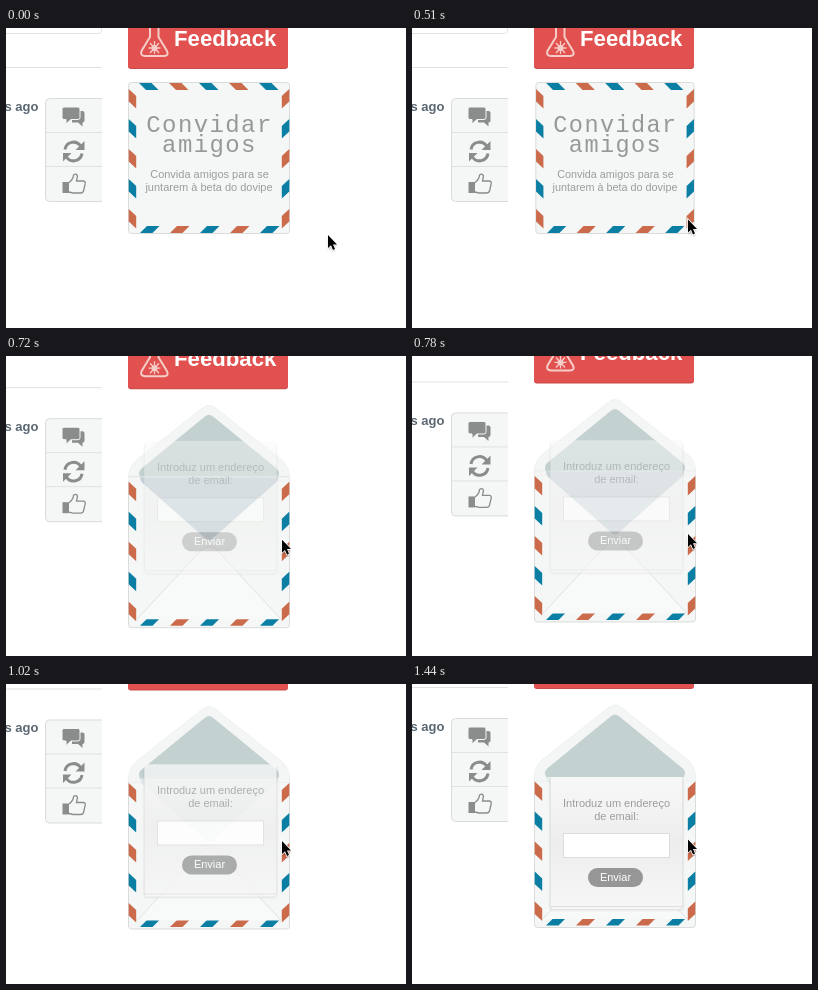
Recreate the animation shown at these times as an HTML page. Size 400 px wide and 300 px high, loop 2280 ms.

```html
<!DOCTYPE html>
<html lang="pt">
<head>
<meta charset="utf-8">
<title>Convidar amigos</title>
<style>
  html, body { margin: 0; width: 100%; height: 100%; overflow: hidden; background: #fff; }
  svg { display: block; width: 400px; height: 300px; }
  text { font-family: "Liberation Sans", Arial, sans-serif; font-size: 11px; fill: #9b9d9c; }
  .mid { text-anchor: middle; }
  .title { font: 24px "Courier New", "Liberation Mono", monospace; letter-spacing: 1.4px; fill: #979998; }
  .card { fill: #f4f7f5; stroke: #d9dcda; }
  .rule { stroke: #dfe2e1; fill: none; }
  .blue { fill: #0b7ea3; }
  .orange { fill: #cc6b4c; }
  .icon { fill: #8b8d8c; }
  .line { fill: none; stroke: #8b8d8c; }
</style>
</head>
<body>
<svg viewBox="0 0 400 300">
  <defs>
    <linearGradient id="paper" x2="0" y2="1">
      <stop offset="0" stop-color="#f8f8f8"/>
      <stop offset=".5" stop-color="#ededed"/>
      <stop offset="1" stop-color="#f6f6f6"/>
    </linearGradient>
    <filter id="soft" x="-20%" y="-20%" width="140%" height="140%">
      <feGaussianBlur stdDeviation="1.2"/>
    </filter>
    <clipPath id="column"><path d="M0 -50H96V400H0Z"/></clipPath>
  </defs>

  <g id="page">
    <g clip-path="url(#column)">
      <path class="rule" d="M0 5.5H92.500Q95.500 5.500 95.500 2.500V-9M0 39.500H96"/>
      <text x="-1.500" y="83" style="font-size:13px;font-weight:bold;fill:#5a6772">s ago</text>
      <rect class="card" x="39.500" y="70.500" width="70" height="103" rx="4"/>
      <path class="rule" d="M40 104.500H96M40 138.500H96"/>
      <g class="icon">
        <path d="M66 83H76.500Q78.500 83 78.500 85V92.500Q78.500 94.500 76.500 94.500V98.500L72 94.500H66Z"/>
        <path d="M58 79H72Q74 79 74 81V89.500Q74 91.500 72 91.500H65L60 96V91.500H58Q56 91.500 56 89.500V81Q56 79 58 79Z" stroke="#f4f7f5"/>
        <path d="M78.500 113V122H69.500ZM57 133.500V125H65.500Z"/>
        <path d="M56.500 154H63V165H56.500Z"/>
      </g>
      <path class="line" stroke-width="3" d="M59 121.500A8.500 8.500 0 0 1 74.500 118M76 125.500A8.500 8.500 0 0 1 60.500 129"/>
      <path class="line" stroke-width="1.300" d="M63 154.500Q67.500 151 67.500 147Q70.500 145 71.500 148L70.500 153H77.500Q80 153.500 79 156.500L77.500 163Q77 165 74.500 165H67L63 164"/>
    </g>

    <rect x="122" y="-20" width="160" height="61" rx="3" fill="#c94a49"/>
    <rect x="122" y="-20" width="160" height="60" rx="3" fill="#e0514f"/>
    <g fill="none" stroke="#f6cdc8" stroke-width="2">
      <path d="M144 -4V9L135.500 23Q134 28 139 28H158Q163 28 161 23L152.500 9V-4"/>
      <path stroke-width="1.300" d="M144 15L153 25M153 15L144 25M142.500 20H154.500M148.500 13V26"/>
    </g>
    <circle cx="148.500" cy="20" r="3" fill="#f6cdc8"/>
    <text x="168" y="18" style="font-size:22.200px;font-weight:bold;fill:#fff">Feedback</text>

    <g id="front">
      <rect class="card" x="122.500" y="54.500" width="161" height="151" rx="3"/>
      <g id="trim"></g>
      <text class="mid title" x="203.500" y="104">Convidar</text>
      <text class="mid title" x="203.500" y="124">amigos</text>
      <text class="mid" x="203.500" y="150">Convida amigos para se</text>
      <text class="mid" x="203" y="163">juntarem à beta do dovipe</text>
    </g>

    <g id="back">
      <g id="body">
        <rect class="card" x="122.500" y="54.500" width="161" height="151" rx="3"/>
        <g id="backTrim" transform="translate(0 -1.500)"></g>
        <path d="M131 197L195 128Q203 121 211 128L275 197" fill="#f8f9f9" stroke="#e0e3e2"/>
      </g>
      <g id="flap">
        <path d="M122 133Q122 119 130 112L196 60Q203 54 210 60L276 112Q284 119 284 133Z" fill="#f4f6f5" stroke="#ebeeed" stroke-width=".7"/>
        <path d="M134 129Q131 123 137 119L198 69Q203 64 208 69L269 119Q275 123 272 129Z" fill="#c4d1d1"/>
      </g>
      <path id="pocket" d="M134 129H272Q272 133 268 136L208 189Q203 195 198 189L138 136Q134 133 134 129Z" fill="#c0ccd3"/>
      <path id="lip" class="rule" d="M123 128.500H283"/>
    </g>

    <g id="form">
      <rect x="138" y="131" width="133" height="131" rx="3" fill="#000" opacity=".14" filter="url(#soft)"/>
      <rect x="138.500" y="129.500" width="132" height="132" rx="3" fill="#f6f6f6" stroke="#e4e4e4"/>
      <rect x="139" y="129" width="131" height="129" fill="url(#paper)"/>
      <path d="M139 258.500H270" stroke="#dedede"/>
      <text class="mid" x="204.500" y="159">Introduz um endereço</text>
      <text class="mid" x="204.500" y="172">de email:</text>
      <rect x="151.500" y="185.500" width="106" height="24" fill="#fff" stroke="#dcdcdc"/>
      <rect x="176" y="220" width="55" height="19" rx="9.500" fill="#959695"/>
      <text class="mid" x="203.500" y="233" style="fill:#fff">Enviar</text>
    </g>

    <g id="cursor">
      <path d="M0 2V15L3 12L5 16.500L7 15.500L5 11H9Z" fill="#000" opacity=".35" filter="url(#soft)"/>
      <path d="M0 0V13L3 10.200L5 15L7 14.100L5 9.400H9Z" fill="#000" stroke="#fff" stroke-width="1.600" paint-order="stroke"/>
    </g>
  </g>
</svg>
<script>
const $ = id => document.getElementById(id);
const LOOP = 2280, STEP = 30, MID = 203;
const clamp = v => Math.min(1, Math.max(0, v));
const span = (t, a, b) => clamp((t - a) / (b - a));
const swing = p => (1 - Math.cos(Math.PI * p)) / 2;

// Airmail border: five slanted stripes per side, alternating colours.
function stripes(withTop) {
  let out = "";
  for (let i = 0; i < 5; i++) {
    const x = 134 + 30 * i, y = 61 + 30 * i;
    const across = i % 2 ? "orange" : "blue", down = i % 2 ? "blue" : "orange";
    const add = (cls, d) => out += `<path class="${cls}" d="${d}"/>`;
    add(across, `M${x} 205l7 -7h12.500l-7 7z`);
    if (withTop) add(across, `M${x - 1} 55h12.500l7 7h-12.500z`);
    add(down, `M122.700 ${y}l7.500 7v12.500l-7.500 -7z`);
    add(down, `M283.300 ${y}l-7.500 7v12.500l7.500 -7z`);
  }
  return out;
}
$("trim").innerHTML = stripes(true);
$("backTrim").innerHTML = stripes(false);

const move = (id, value) => $(id).setAttribute("transform", value);
const fade = (id, value) => $(id).setAttribute("opacity", value);
const show = (id, on) => $(id).setAttribute("display", on ? "inline" : "none");

// Quadratic through a at 0, b at 300 and c at 510 ms.
function through(t, a, b, c) {
  const s = (b - a) / 300, k = ((c - b) / 210 - s) / 510;
  return a + s * t + k * t * (t - 300);
}

function draw(t) {
  move("page", `translate(0 ${-36 * swing(span(t, 555, 1090))})`);

  const m = Math.min(t, 510);
  move("cursor", `translate(${through(m, 322, 291, 276)} ${through(m, 207, 205, 191.500)})`);

  const turn = Math.cos(Math.PI * swing(span(t, 477, 690)));
  const flip = `translate(${MID} 0) scale(${Math.max(.001, Math.abs(turn))} 1) translate(${-MID} 0)`;
  show("front", turn > 0);
  show("back", turn <= 0);
  move("front", flip);
  move("back", flip);
  move("body", `translate(0 ${74 * swing(span(t, 560, 690))})`);

  const open = swing(span(t, 620, 715));
  move("flap", `translate(0 128) scale(1 ${Math.max(.001, open)}) translate(0 -128)`);
  fade("pocket", open * (.85 - .6 * span(t, 720, 1050)));
  fade("lip", open * (1 - span(t, 720, 840)));

  const left = 36 * (Math.max(0, 1516 - t) / 796) ** 2;
  move("form", `translate(0 ${-Math.round(left)})`);
  fade("form", t < 1440 ? clamp(1 - left / 60) * span(t, 600, 700) : 1);
}

const start = performance.now();
function tick() {
  const t = (performance.now() - start) % LOOP;
  draw(Math.floor(t / STEP) * STEP);
  requestAnimationFrame(tick);
}
tick();
</script>
</body>
</html>
```
